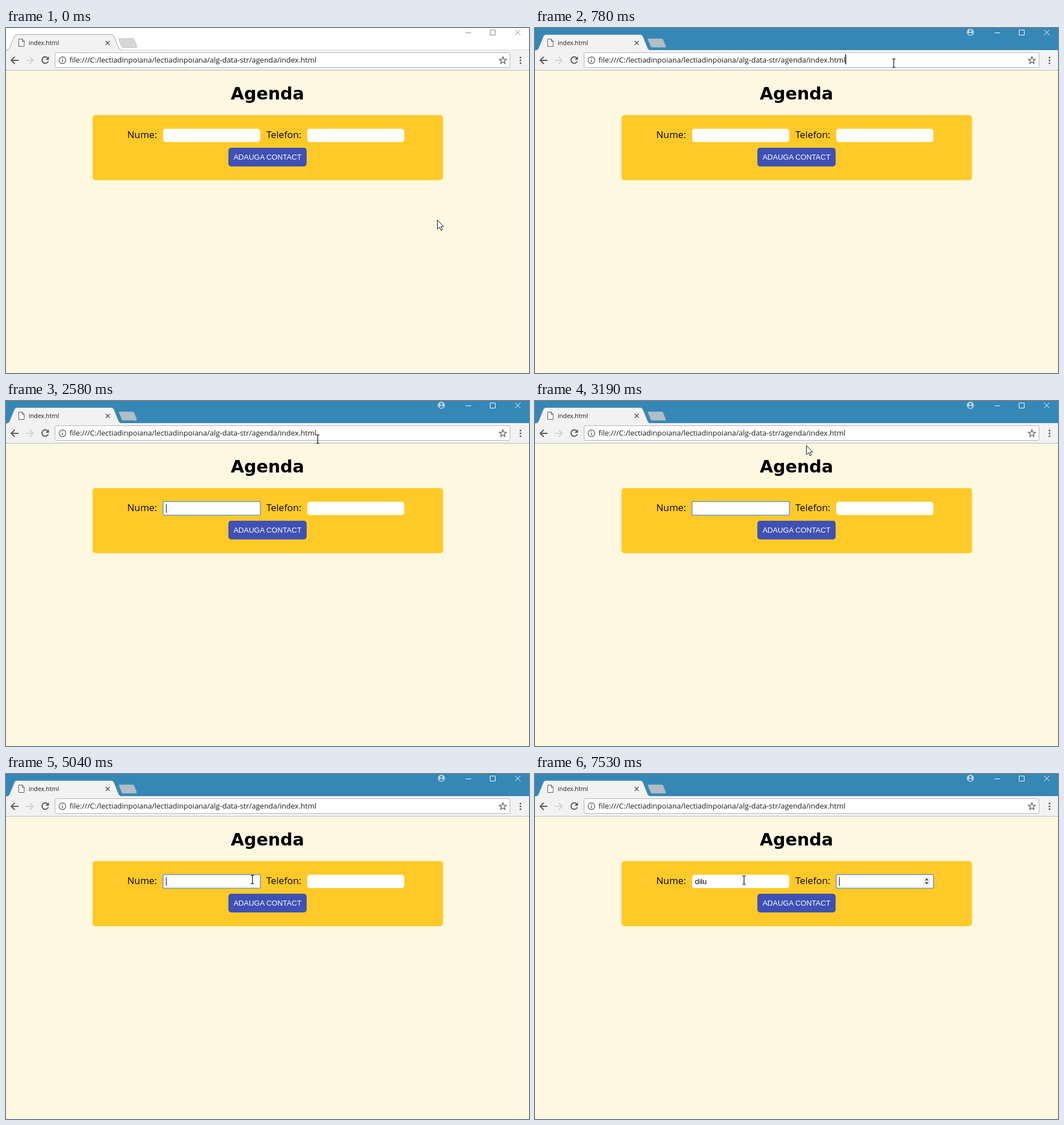
An HTML page that plays this animation: 922 px wide and 608 px high, repeating every 8000 ms.

```html
<!DOCTYPE html>
<html lang="ro">
<head>
<meta charset="utf-8">
<title>Agenda</title>
<style>
  html, body { margin: 0; width: 100%; height: 100%; overflow: hidden; background: #fff8e1; }
  svg { display: block; width: 922px; height: 608px; }
  text { white-space: pre; }
  .ui { font-family: "Open Sans", "Noto Sans", sans-serif; fill: #1c1c1c; }
  .label { font: 16.8px "Open Sans", "Noto Sans", sans-serif; }
  .title { font: 700 30.3px "DejaVu Sans", sans-serif; text-anchor: middle; }
  .value { font: 13.333px "Liberation Sans", Arial, sans-serif; }
  .button { font: 13px "Liberation Sans", Arial, sans-serif; fill: #fff; text-anchor: middle; }
  .line { fill: none; stroke: #5a5a5a; }
  .box { fill: #fff; }
  .ring { fill: #fff; stroke: #6f97c4; stroke-width: 1.6; }
  #bar { fill: #fff; }
  #strip { stroke: #b2b2b2; }
  #tab { fill: #f2f2f2; stroke: #a3a3a3; }
  #plus { fill: #d6d6d6; stroke: #c4c4c4; }
  #controls { fill: none; stroke: #868686; }
  #user { visibility: hidden; }
  .active #bar { fill: #3587b5; }
  .active #strip { stroke: #4f8aaa; }
  .active #tab { stroke: #5c93b0; }
  .active #plus { fill: #b0bec7; stroke: #5c93b0; }
  .active #controls { stroke: #fff; }
  .active #user { visibility: visible; }
</style>
</head>
<body>
<svg id="stage" viewBox="0 0 922 608">
  <rect width="922" height="608" fill="#fff8e1"/>

  <!-- window frame -->
  <rect id="bar" width="922" height="39"/>
  <path id="strip" d="M0 39H922"/>
  <rect y="39" width="922" height="35" fill="#f2f2f2"/>
  <path d="M0 74.5H922" stroke="#b9b9b4"/>
  <path id="tab" d="M0 39H2Q5 38.5 6 36L14.5 15Q16 11.5 19 11.5H186Q189 11.5 190.5 15L199 36Q200 38.5 203 39"/>
  <path d="M4 39H201" stroke="#f2f2f2" stroke-width="1.6"/>
  <path id="plus" d="M200.5 18.5H223Q225.5 18.5 226.5 21L230.5 31.5Q231.5 34.5 229 34.5H207Q204.5 34.5 203.5 32L199 21Q198 18.5 200.5 18.5Z"/>
  <path d="M22.5 19.5H28.5L32 23V32.5H22.5ZM28.5 19.5V23.5H32" fill="#fff" stroke="#555"/>
  <text class="ui" x="40" y="30" font-size="10.8">index.html</text>
  <path class="line" d="M175.7 22.7L182.8 29.8M182.8 22.7L175.7 29.8" stroke-width="1.6"/>
  <g id="user">
    <circle cx="767.5" cy="7.5" r="6.2" fill="#b9d6e6"/>
    <circle cx="767.5" cy="5.2" r="2" fill="#3587b5"/>
    <path d="M763.5 10.6Q767.5 6.5 771.5 10.6Q767.5 14 763.5 10.6Z" fill="#3587b5"/>
  </g>
  <path id="controls" d="M810 8.5H820M853.5 3.5H862.5V12.5H853.5ZM897.5 3L907 12.5M907 3L897.5 12.5"/>

  <!-- toolbar -->
  <path class="line" d="M22 57H9.5M15.5 50.7L9.2 57L15.5 63.3" stroke-width="2"/>
  <path class="line" d="M35 57H47.5M41.5 50.7L47.8 57L41.5 63.3" style="stroke:#d2d2d2" stroke-width="2"/>
  <path class="line" d="M73.6 53A5.7 5.7 0 1 0 74.5 58.5" stroke-width="2"/>
  <path d="M75.7 50V56H69.7Z" fill="#5a5a5a"/>
  <rect class="editable" x="86.5" y="43.5" width="802" height="26" rx="2" fill="#fff" stroke="#b2b2b2"/>
  <circle class="line" cx="99.5" cy="56.8" r="5.9" stroke-width="1.3"/>
  <path class="line" d="M99.5 53V54.6M99.5 56V60.2" stroke-width="1.5"/>
  <text class="ui" x="112" y="61" font-size="13">file:///C:/lectiadinpoiana/lectiadinpoiana/alg-data-str/agenda/index.html</text>
  <path class="line" id="star" stroke-width="1.3"/>
  <path d="M907 52V62.1" stroke="#5a5a5a" stroke-width="3.2" stroke-linecap="round" stroke-dasharray="0 5"/>

  <!-- page -->
  <text class="title editable" x="461" y="126">Agenda</text>
  <rect x="152.6" y="153.6" width="617.8" height="114.6" rx="5" fill="#ffca28"/>
  <text class="label editable" x="213.7" y="194">Nume:</text>
  <text class="label editable" x="459" y="194">Telefon:</text>
  <rect class="box editable" x="277" y="177.5" width="171.3" height="23.6" rx="5"/>
  <rect class="box editable" x="531" y="177.5" width="171.3" height="23.6" rx="5"/>
  <rect id="nameRing" class="ring" x="276.8" y="177.3" width="171.7" height="24" rx="2"/>
  <g id="phone">
    <rect class="ring" x="530.8" y="177.3" width="171.7" height="24" rx="2"/>
    <rect x="684" y="181" width="13" height="16" fill="#f0f0f0"/>
    <path d="M687 187.5L690.5 183.5L694 187.5ZM687 190.5L690.5 194.5L694 190.5Z" fill="#505050"/>
  </g>
  <text id="name" class="value" x="282" y="193.5"></text>
  <rect x="392" y="211" width="138" height="33" rx="5" fill="#3f51b5"/>
  <text class="button" x="461" y="232">ADAUGA CONTACT</text>

  <rect id="urlCaret" x="547" y="46.5" width="1.4" height="17.5"/>
  <rect id="caret" y="182" width="1" height="15"/>
  <path id="arrow" d="M.5 .5V16.5L4.2 13L6.8 18.6L9.2 17.5L6.7 12H11.5Z" fill="#fff" stroke="#111"/>
  <path id="beam" d="M-3-7.5H-1L0-6.5L1-7.5H3M0-6.5V6.5M-3 7.5H-1L0 6.5L1 7.5H3" fill="none" stroke="#111" stroke-width="1.2"/>
</svg>
<script>
const LOOP = 8000, STEP = 77, BLINK = 542;
const windowOn = 780, nameOn = 1480, typeOn = 7050, phoneOn = 7530;
const typed = "dilu";
const rest = { x: 760, y: 338 };

// Pointer strokes; each begins where the one before it ended.
const strokes = [
  { from: 70, to: 550, x: 632, y: 62 },
  { from: 2270, to: 2810, x: 486, y: 78 },
  { from: 2960, to: 3740, x: 447, y: 90 },
  { from: 3740, to: 3970, x: 318, y: 139 },
  { from: 3970, to: 4580, x: 255, y: 180 },
  { from: 4580, to: 5040, x: 434, y: 186 },
  { from: 5040, to: 5360, x: 624, y: 220 },
  { from: 5580, to: 5820, x: 376, y: 178 },
  { from: 6050, to: 6200, x: 368, y: 187 }
];

const $ = id => document.getElementById(id);
const show = (id, on) => $(id).setAttribute("visibility", on ? "visible" : "hidden");
const mix = (a, b, p) => Math.round(a + (b - a) * p);

// Text pointer wherever text can be selected or edited.
const editable = [...document.querySelectorAll(".editable")].map(el => el.getBBox());
const inside = (b, p) => p.x >= b.x && p.x <= b.x + b.width && p.y >= b.y && p.y <= b.y + b.height;

// Sideways motion is even, vertical motion speeds up; both move in screen-refresh steps.
function pointer(t) {
  let at = rest;
  for (const s of strokes) {
    if (t < s.from) break;
    const steps = Math.round((s.to - s.from) / STEP);
    const done = Math.floor((t - s.from) / (s.to - s.from) * steps + 0.01);
    const p = Math.min(1, done / steps);
    at = { x: mix(at.x, s.x, p), y: mix(at.y, s.y, p * p) };
  }
  return at;
}

function draw(t) {
  const named = t >= nameOn, phoned = t >= phoneOn;
  $("stage").setAttribute("class", t >= windowOn ? "active" : "");
  show("urlCaret", t >= windowOn && !named);
  show("nameRing", named && !phoned);
  show("phone", phoned);

  const chars = Math.floor((t - typeOn) / STEP + 0.05) + 1;
  const name = $("name");
  name.textContent = typed.slice(0, Math.max(0, chars));
  const width = name.textContent ? name.getComputedTextLength() : 0;
  $("caret").setAttribute("x", phoned ? 536 : Math.round(282 + width));
  const lit = Math.floor((t - nameOn) / BLINK + 0.002) % 2 === 0;
  show("caret", named && (t >= typeOn || lit));

  const p = pointer(t);
  const overText = editable.some(b => inside(b, p));
  show("arrow", !overText);
  show("beam", overText);
  $("arrow").setAttribute("transform", `translate(${p.x} ${p.y})`);
  $("beam").setAttribute("transform", `translate(${p.x + 0.5} ${p.y})`);
}

const corners = Array.from({ length: 10 }, (_, i) => {
  const r = i % 2 ? 2.8 : 6.5, a = (i / 5 - 0.5) * Math.PI;
  return [876 + r * Math.cos(a), 57.2 + r * Math.sin(a)].map(v => v.toFixed(1)).join(" ");
});
$("star").setAttribute("d", "M" + corners.join("L") + "Z");

const start = performance.now();
function tick() {
  draw((performance.now() - start) % LOOP);
  requestAnimationFrame(tick);
}
tick();
</script>
</body>
</html>
```
